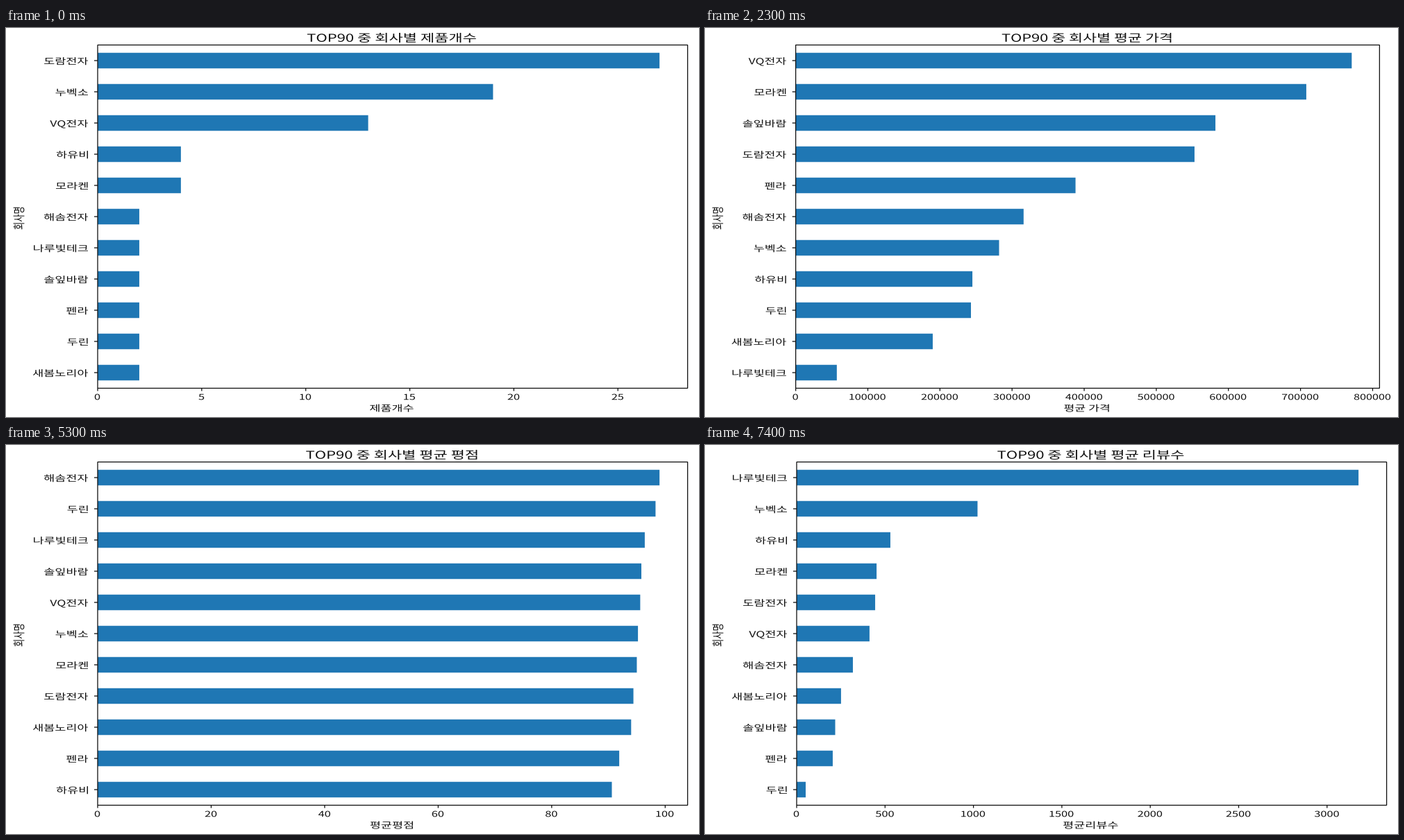
A matplotlib script for the animation above (8 s loop, 998 by 561 pixels).

```python
import matplotlib.pyplot as plt
from matplotlib.animation import FuncAnimation
from matplotlib.patches import PathPatch, Rectangle
from matplotlib.textpath import TextPath
from matplotlib.ticker import MaxNLocator
from matplotlib.transforms import Affine2D

W, H, DPI = 998, 561, 64
FONT = {"family": "Noto Sans CJK JP"}
BLUE = "#1f77b4"
INK = "#111111"
ASPECT = 1.42  # the whole picture is wider than its type
LABEL, NUMBER, TITLE = 12.3, 11.5, 15.5
LINE = 1.3 * 72 / DPI
LEFT, TOP, RIGHT, BOTTOM = 132, 24.5, 981.6, 519.5
MARGIN = 11
STEP = 500

# name, products, mean price in thousands, mean rating, mean reviews
FIRMS = [
    ("도람전자", 27, 553, 94.4, 444),
    ("누벡소", 19, 282, 95.2, 1023),
    ("VQ전자", 13, 771, 95.6, 412),
    ("하유비", 4, 245, 90.6, 530),
    ("모라켄", 4, 708, 95, 452),
    ("해솜전자", 2, 316, 99, 318),
    ("나루빛테크", 2, 57, 96.4, 3178),
    ("솔잎바람", 2, 582, 95.8, 218),
    ("펜라", 2, 388, 91.9, 204),
    ("두린", 2, 243, 98.3, 51),
    ("새봄노리아", 2, 190, 94, 251),
]

# title, axis label, unit, time shown; one for each column of FIRMS
CHARTS = [
    ("제품개수", "제품개수", 1, 500),
    ("평균 가격", "평균 가격", 1000, 3000),
    ("평균 평점", "평균평점", 1, 3000),
    ("평균 리뷰수", "평균리뷰수", 1, 1500),
]

fig = plt.figure(figsize=(W / DPI, H / DPI), dpi=DPI, facecolor="white")


def text(ax, x, y, s, size, align="center", upright=False):
    """Text on baseline y; upright text is turned and centred on (x, y)."""
    path = TextPath((0, 0), s, size=size, prop=FONT)
    turn = Affine2D().rotate_deg(90 if upright else 0).scale(ASPECT, -1)
    path = path.transformed(turn)
    ext = path.get_extents()
    dx = x - (ext.x1 if align == "right" else (ext.x0 + ext.x1) / 2)
    dy = y - (ext.y0 + ext.y1) / 2 if upright else y
    path = path.transformed(Affine2D().translate(dx, dy))
    ax.add_patch(PathPatch(path, fc=INK, lw=0))
    return path.get_extents()


def line(ax, x0, y0, x1, y1):
    ax.plot([x0, x1], [y0, y1], color=INK, lw=LINE, snap=False,
            solid_capstyle="butt")


def build(column, title, xlabel, unit):
    ax = fig.add_axes([0, 0, 1, 1])
    ax.axis("off")

    rows = sorted(FIRMS, key=lambda firm: -firm[column])
    limit = rows[0][column] * unit * 1.05
    scale = (RIGHT - LEFT) / limit
    pitch = (BOTTOM - TOP) / len(rows)
    for i, firm in enumerate(rows):
        y = TOP + pitch * (i + 0.5)
        length = firm[column] * unit * scale
        ax.add_patch(Rectangle((LEFT, y - pitch / 4), length, pitch / 2,
                               fc=BLUE, lw=0, snap=False))
        line(ax, LEFT - 5, y, LEFT, y)
        text(ax, LEFT - 14, y + 5.3, firm[0], LABEL, "right")

    for v in MaxNLocator(9, steps=[1, 2, 5, 10]).tick_values(0, limit):
        if v <= limit:
            x = LEFT + v * scale
            line(ax, x, BOTTOM, x, BOTTOM + 4)
            last = text(ax, x - 0.5, 536.2, f"{v:.0f}", NUMBER)

    ax.add_patch(Rectangle((LEFT, TOP), RIGHT - LEFT, BOTTOM - TOP,
                           fill=False, ec=INK, lw=LINE, snap=False))
    middle = (LEFT + RIGHT) / 2 - 1.5
    text(ax, middle, 19.8, f"TOP90 중 회사별 {title}", TITLE)
    text(ax, middle, 552.7, xlabel, LABEL)
    text(ax, 18.5, 274.5, "회사명", LABEL, upright=True)

    # an overhanging last number squeezes the whole chart
    ax.set_xlim(0, max(W, last.x1 + MARGIN))
    ax.set_ylim(H, 0)
    return ax


scenes = [build(col, *chart[:3]) for col, chart in enumerate(CHARTS, 1)]
schedule = [i for i, chart in enumerate(CHARTS)
            for _ in range(chart[3] // STEP)]


def show(frame):
    for i, ax in enumerate(scenes):
        ax.set_visible(i == schedule[frame])
    return []


anim = FuncAnimation(fig, show, frames=len(schedule), interval=STEP,
                     init_func=lambda: show(0), repeat=True, repeat_delay=0)
plt.show()
```
